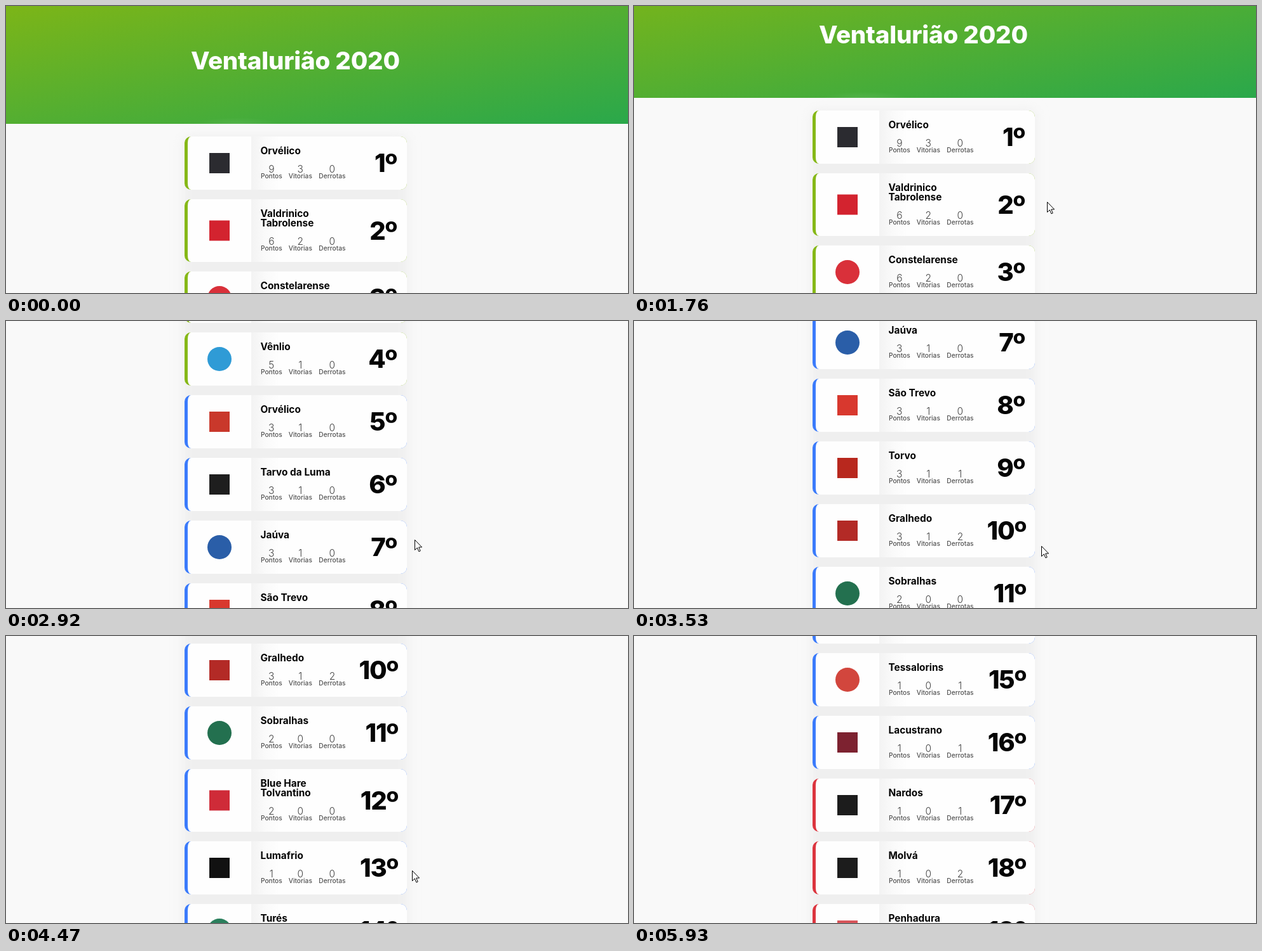
Recreate the animation shown at these times as an HTML page. Size 979 px wide and 453 px high, loop 6.73 s.

```html
<!DOCTYPE html>
<html lang="pt-BR">
<head>
<meta charset="utf-8">
<title>Tabela</title>
<style>
  html, body { margin: 0; width: 100%; height: 100%; overflow: hidden; background: #f9f9f9; }
  svg { display: block; width: 100%; height: 100%; font-family: Inter, Roboto, sans-serif; }
  .title { font-size: 38.5px; font-weight: 800; letter-spacing: -.2px; fill: #fff; }
  .name { font-size: 15.4px; font-weight: 700; fill: #050505; }
  .num { font-size: 15.5px; font-weight: 300; fill: #444; text-anchor: middle; }
  .label { font-size: 10.2px; font-weight: 500; fill: #505050; text-anchor: middle; }
  .rank { font-size: 40px; font-weight: 800; letter-spacing: -1.2px; fill: #050505; text-anchor: end; }
</style>
</head>
<body>
<svg viewBox="0 0 979 453">
  <defs>
    <linearGradient id="green" x2="1" y2="1">
      <stop stop-color="#7cb518"/><stop offset="1" stop-color="#2aa84b"/>
    </linearGradient>
    <linearGradient id="side">
      <stop stop-color="#f3f3f3"/><stop offset=".5" stop-color="#fafafa"/><stop offset="1" stop-color="#fefefe"/>
    </linearGradient>
    <radialGradient id="glow">
      <stop stop-color="#fff" stop-opacity=".09"/><stop offset="1" stop-color="#fff" stop-opacity="0"/>
    </radialGradient>
    <filter id="soft" filterUnits="userSpaceOnUse" x="230" y="160" width="452" height="2080">
      <feGaussianBlur stdDeviation="9"/>
    </filter>
    <clipPath id="headClip"><rect width="979" height="186"/></clipPath>
  </defs>
  <rect width="979" height="453" fill="#f9f9f9"/>
  <g id="page">
    <rect width="979" height="186" fill="url(#green)"/>
    <ellipse cx="364" cy="188" rx="70" ry="12" fill="url(#glow)" clip-path="url(#headClip)"/>
    <text class="title" x="291" y="100">Ventalurião 2020</text>
    <rect x="279" y="205" width="354" height="1997" rx="10" fill="#efefef" filter="url(#soft)"/>
  </g>
  <path id="cursor" d="M.5 .5V16.5L4.3 12.9L6.9 18.9L9.2 17.9L6.7 12H11.6Z" fill="#fff" stroke="#000"/>
</svg>
<script>
const LOOP = 6730, TICK = 77.1, START = 1530;
const page = document.getElementById('page');
const cursor = document.getElementById('cursor');

// name | points, wins, losses | badge colour | badge shape
const teams = `Orvélico|930|#2b2b30|s
Valdrinico/Tabrolense|620|#d3232f|s
Constelarense|620|#d9303a|c
Vênlio|510|#2f9bd6|c
Orvélico|310|#c9382b|s
Tarvo da Luma|310|#1e1e1e|s
Jaúva|310|#2a5ea8|c
São Trevo|310|#d8382e|s
Torvo|311|#b8281e|s
Gralhedo|312|#b32a26|s
Sobralhas|200|#23704f|c
Blue Hare/Tolvantino|200|#cf2b38|s
Lumafrio|100|#111111|s
Turés|100|#2a7f5c|c
Tessalorins|101|#d2463d|c
Lacustrano|101|#7d2230|s
Nardos|101|#1c1c1c|s
Molvá|102|#1c1c1c|s
Penhadura|000|#d8545a|s`.split('\n').map(row => row.split('|'));

function add(parent, tag, attrs, text) {
  const el = document.createElementNS('http://www.w3.org/2000/svg', tag);
  for (const key in attrs) el.setAttribute(key, attrs[key]);
  if (text !== undefined) el.textContent = text;
  parent.append(el);
  return el;
}

function addCard([name, stats, color, shape], place, top) {
  const lines = name.split('/');
  const extra = (lines.length - 1) * 15, h = 84 + extra, mid = h / 2;
  const accent = place < 5 ? '#86b817' : place < 17 ? '#3b7bfb' : '#dc353f';
  const g = add(page, 'g', { transform: `translate(281 ${top})` });
  const put = (cls, x, y, text) => add(g, 'text', { class: cls, x, y }, text);

  add(g, 'rect', { width: 350, height: h, rx: 10, fill: accent });
  add(g, 'path', {
    d: `M10 0H340a10 10 0 0 1 10 10V${h - 10}a10 10 0 0 1 -10 10H10a5 10 0 0 1 -5 -10V10a5 10 0 0 1 5 -10Z`,
    fill: '#fefefe'
  });
  add(g, 'rect', { x: 105, width: 44, height: h, fill: 'url(#side)' });

  if (shape === 'c') add(g, 'circle', { cx: 55, cy: mid, r: 19, fill: color });
  else add(g, 'rect', { x: 39, y: mid - 16, width: 32, height: 32, fill: color });

  lines.forEach((line, i) => put('name', 119.5, 28 + i * 15, line));
  [['Pontos', 136.8], ['Vitorias', 182.3], ['Derrotas', 232.4]].forEach(([label, x], i) => {
    put('num', x, 56.5 + extra, stats[i]);
    put('label', x, 66 + extra, label);
  });
  put('rank', place < 10 ? 334 : 336, Math.floor(mid + 14.5), place + 'º');
  return top + h + 15;
}

teams.reduce((top, team, i) => addCard(team, i + 1, top), 206);

// Keys are [tick, value, ...], ticks counted from START.
const scrollKeys = [[2, 0], [3, 41], [10, 291], [16, 500], [18, 500], [26, 823], [31, 1100], [38, 1100], [46, 1595]];
const cursorKeys = [
  [-16, 851, 440], [-15, 772, 390], [-14, 716, 350], [-13, 680, 322], [-12, 660, 307], [-11, 653, 302],
  [-1, 653, 302], [3, 650, 309], [10, 645, 328], [16, 643, 342], [26, 641, 355], [33, 641, 357],
  [38, 639, 370], [46, 639, 375], [48, 639, 375], [52, 637, 378], [53, 637, 378], [56, 650, 405]
];

function sample(keys, k) {
  if (k <= keys[0][0]) return keys[0].slice(1);
  const next = keys.findIndex(key => key[0] > k);
  if (next < 0) return keys[keys.length - 1].slice(1);
  const a = keys[next - 1], b = keys[next], p = (k - a[0]) / (b[0] - a[0]);
  return a.slice(1).map((v, i) => v + (b[i + 1] - v) * p);
}

function draw(t) {
  const k = Math.floor((t - START + 8) / TICK);
  page.setAttribute('transform', `translate(0 ${-Math.round(sample(scrollKeys, k)[0])})`);
  const [x, y] = sample(cursorKeys, k).map(Math.round);
  cursor.setAttribute('transform', `translate(${x} ${y})`);
  cursor.setAttribute('visibility', k >= -16 && k < 57 ? 'visible' : 'hidden');
}

const begin = performance.now();
function frame() {
  draw((performance.now() - begin) % LOOP);
  requestAnimationFrame(frame);
}
frame();
</script>
</body>
</html>
```
